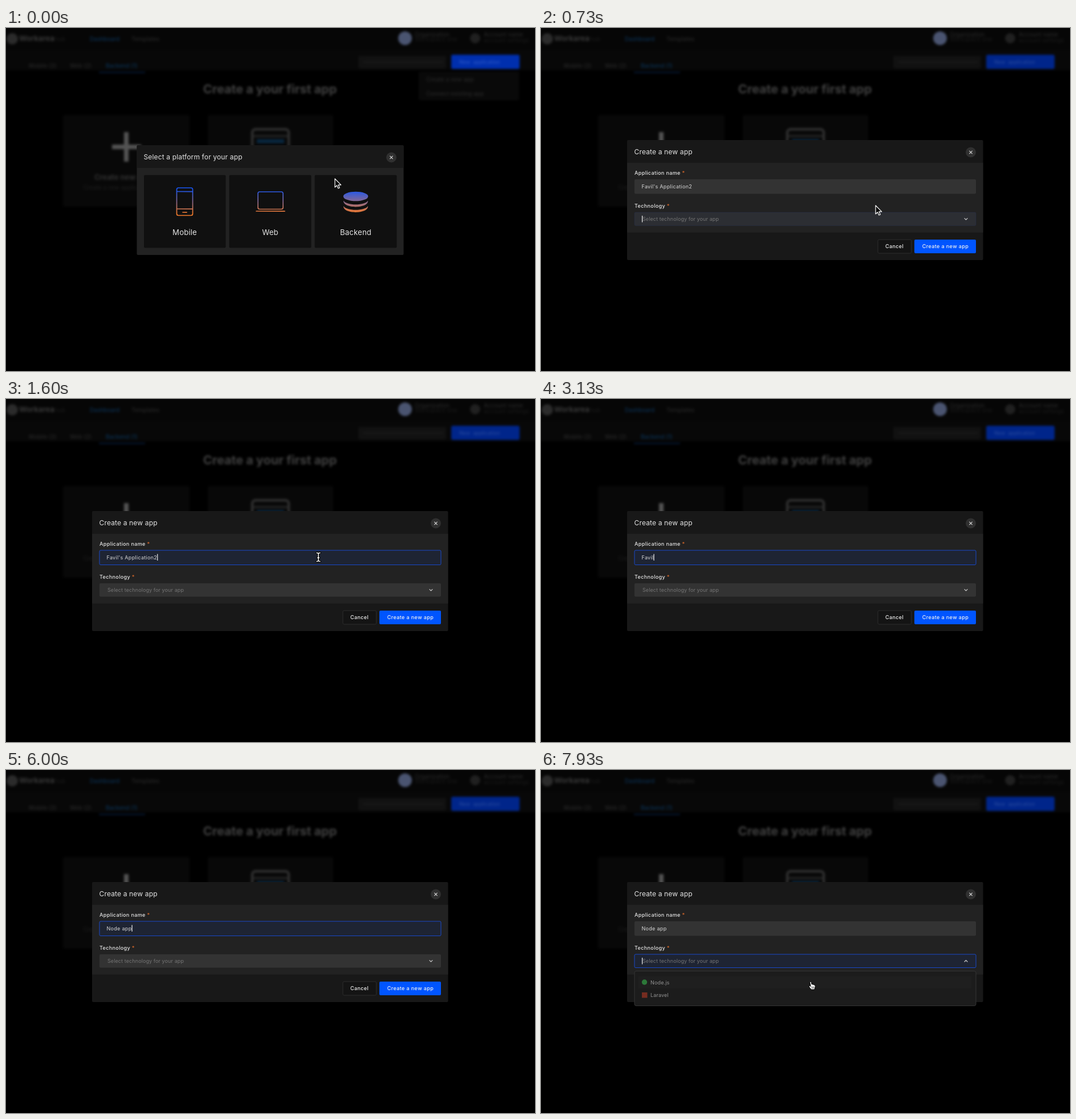
Animation of 928x603 px, one loop 8 s. Source, as an HTML page:

```html
<!DOCTYPE html>
<html lang="en">
<head>
<meta charset="utf-8">
<title>Create a new app</title>
<style>
html, body { margin: 0; width: 100%; height: 100%; overflow: hidden; background: #000; }
svg { display: block; }
text { font-family: Inter, sans-serif; white-space: pre; fill: #e4e4e4; }
.backdrop { filter: blur(2px); }
.backdrop text { font-size: 10px; fill: #272727; font-weight: 500; }
.backdrop .heading { font-size: 21.6px; font-weight: 700; fill: #404040; text-anchor: middle; }
.backdrop .link { fill: #0b3154; }
.title { font-size: 12px; letter-spacing: .15px; }
.platform { font-size: 13.2px; letter-spacing: .15px; text-anchor: middle; }
.label { font-size: 9.1px; letter-spacing: .32px; font-weight: 500; }
.value { font-size: 9px; letter-spacing: .3px; fill: #d6d6d6; }
.hint { font-size: 9px; letter-spacing: .1px; fill: #747474; }
.item { font-size: 9px; letter-spacing: .15px; fill: #929292; }
.button { font-size: 9px; letter-spacing: .38px; font-weight: 500; text-anchor: middle; fill: #f2f2f2; }
.star { fill: #d9692a; }
.head { fill: #181818; }
.body { fill: #222; }
.card { fill: #101010; }
.line { fill: none; stroke-width: 1.7; stroke-linecap: round; stroke-linejoin: round; }
</style>
</head>
<body>
<svg width="928" height="603" viewBox="0 0 928 603">
  <defs>
    <linearGradient id="tint" gradientUnits="userSpaceOnUse" x1="0" x2="0" y1="284" y2="326">
      <stop stop-color="#1856f5"/><stop offset="1" stop-color="#f37a2b"/>
    </linearGradient>
    <g id="close">
      <circle r="9" fill="#303030"/>
      <path d="M-2.6-2.6 2.6 2.6M2.6-2.6-2.6 2.6" stroke="#ddd" stroke-width="1.1"/>
    </g>
  </defs>

  <g class="backdrop">
    <rect x="-9" y="-9" width="946" height="47" fill="#060606"/>
    <rect x="-9" y="38" width="946" height="36" fill="#080808"/>
    <circle cx="11" cy="19" r="10" fill="#2b2b2b"/>
    <text x="23" y="23" style="font-size:13px;font-weight:700;fill:#383838">Workarea</text>
    <text x="86" y="23" style="fill:#181818">hub</text>
    <text x="147" y="23" class="link">Dashboard</text>
    <text x="220" y="23">Templates</text>
    <circle cx="700" cy="18" r="12" fill="#4a5470"/>
    <text x="717" y="15">Organization</text>
    <text x="717" y="23" style="fill:#181818">Workspace one</text>
    <circle cx="823" cy="18" r="9" fill="#202020"/>
    <text x="838" y="15">Account name</text>
    <text x="838" y="25" style="fill:#181818">account settings</text>
    <text x="40" y="70">Mobile (3)</text>
    <text x="112" y="70">Web (2)</text>
    <text x="175" y="70" class="link">Backend (1)</text>
    <path d="M163 78H244" stroke="#071d3c" stroke-width="2"/>
    <rect x="618" y="49" width="154" height="22" rx="3" fill="#111"/>
    <path d="M627 60H766" stroke="#1c1c1c" stroke-width="2"/>
    <rect x="781" y="47" width="120" height="25" rx="3" fill="#00258a"/>
    <text x="795" y="63" style="font-size:9px;fill:#25489c">New&#160; application</text>
    <g id="menu">
      <rect x="781" y="47" width="120" height="25" rx="3" fill="#002fae"/>
      <text x="795" y="63" style="font-size:9px;fill:#2a56c4">New&#160; application</text>
      <rect x="724" y="77" width="176" height="50" rx="3" fill="#090909"/>
      <text x="737" y="94">Create a new app</text>
      <text x="737" y="119">Connect existing app</text>
    </g>
    <text x="463" y="115" class="heading">Create a your first app</text>
    <rect x="100" y="153" width="222" height="161" rx="3" fill="#080808"/>
    <rect x="354" y="153" width="220" height="161" rx="3" fill="#080808"/>
    <path d="M211 183V235M186 209H237" stroke="#535353" stroke-width="8"/>
    <text x="155" y="267" style="font-size:13px;font-weight:700;fill:#303030">Create new app</text>
    <text x="136" y="284" style="fill:#1c1c1c">Create a new application</text>
    <rect x="432" y="178" width="64" height="55" rx="6" fill="#080808" stroke="#333" stroke-width="4"/>
    <path d="M433 190H495" stroke="#292929" stroke-width="3"/>
    <path d="M440 199H488" stroke="#082740" stroke-width="7"/>
  </g>

  <g id="picker">
    <rect class="body" x="229.5" y="206" width="468" height="193" rx="2"/>
    <rect class="head" x="229.5" y="206" width="468" height="40" rx="2"/>
    <text class="title" x="241.5" y="231">Select a platform for your app</text>
    <use href="#close" x="676" y="227.5"/>
    <rect class="card" x="242" y="258.5" width="143.5" height="128" rx="2"/>
    <rect class="card" x="391.5" y="258.5" width="144" height="128" rx="2"/>
    <rect class="card" x="541.5" y="258.5" width="144" height="128" rx="2" id="hover" stroke="#173c94"/>
    <g class="line" stroke="url(#tint)">
      <rect x="299.5" y="281" width="28" height="48.5" rx="3"/>
      <path d="M300 287.5 327 287.6M300 318 327 318.1M310 324 317 324.1"/>
      <rect x="442" y="288" width="44" height="30.5" rx="3"/>
      <path d="M439 322 489 322.1"/>
    </g>
    <g fill="url(#tint)">
      <ellipse cx="613.5" cy="296" rx="21.8" ry="8.3"/>
      <path id="disc" d="M592 303.5C597 312.5 630 312.5 635 303.5C636 318 591 318 592 303.5Z"/>
      <path d="M592 313C597 322 630 322 635 313C636 327.500 591 327.500 592 313Z"/>
    </g>
    <text class="platform" x="313.500" y="364">Mobile</text>
    <text class="platform" x="463.500" y="364">Web</text>
    <text class="platform" x="613.500" y="364">Backend</text>
  </g>

  <g id="form">
    <rect class="head" x="151" y="197" width="624.5" height="211" rx="2"/>
    <rect class="body" x="151" y="237" width="624.5" height="122.5"/>
    <text class="title" x="163.5" y="221.500">Create a new app</text>
    <use href="#close" x="754" y="218.500"/>
    <text class="label" x="164" y="258">Application name <tspan class="star">*</tspan></text>
    <rect id="nameBox" x="164" y="266" width="599" height="25.500" rx="2"/>
    <text class="hint" id="nameHint" x="177" y="282">Enter app name</text>
    <text class="value" id="name" x="176.500" y="282"></text>
    <text class="label" x="164" y="316">Technology <tspan class="star">*</tspan></text>
    <rect id="techBox" x="164" y="324" width="599" height="23.500" rx="2"/>
    <text class="hint" x="178" y="339">Select technology for your app</text>
    <path id="chevron" class="line" d="M-2.500-1.200 0 1.300 2.500-1.200" stroke="#ccc" style="stroke-width:1.200"/>
    <rect x="591" y="372" width="58.500" height="24" rx="2" fill="#141414" stroke="#2c2c2c"/>
    <text class="button" x="620" y="387">Cancel</text>
    <rect x="655" y="372" width="108" height="24" rx="2" fill="#0055ff"/>
    <text class="button" x="709.500" y="387">Create a new app</text>
    <g id="list">
      <rect x="164" y="353.500" width="599" height="61" rx="3" fill="#1c1c1c" stroke="#343434"/>
      <rect x="171" y="363" width="584" height="21" fill="#1f1f1f"/>
      <circle cx="181.500" cy="373" r="4.700" fill="#2c7839"/>
      <text class="item" x="192" y="376.500">Node.js</text>
      <rect x="177" y="391" width="9.500" height="9.500" fill="#752c20"/>
      <text class="item" x="192" y="399">Laravel</text>
    </g>
    <rect id="caret" width="1.200" height="11.500" fill="#eee"/>
  </g>

  <g id="cursor" stroke-linejoin="round" stroke-linecap="round">
    <path id="arrow" d="M0 0V15L3.500 11.800 5.800 17 8.200 16 6 10.900H10.700Z" fill="#080808" stroke="#fff" stroke-width="1.200"/>
    <g id="beam" fill="none">
      <path id="stem" d="M-3-7.500Q0-7.500 0-5.500Q0-7.500 3-7.500M0-5.500V5.500M-3 7.500Q0 7.500 0 5.500Q0 7.500 3 7.500M-1.500 1H1.500" stroke="#000" stroke-width="3.500"/>
      <use href="#stem" style="stroke:#fff"/>
      <path d="M-3-7.500Q0-7.500 0-5.500Q0-7.500 3-7.500M0-5.500V5.500M-3 7.500Q0 7.500 0 5.500Q0 7.500 3 7.500M-1.500 1H1.500" stroke="#fff" stroke-width="1.500"/>
    </g>
    <g id="hand">
      <path d="M-1.200 1Q0-1.500 1.200 1L2 5Q3.500 3.800 4.300 5.400Q5.800 4.500 6.500 6.200Q8.200 5.800 8.200 8L7.700 11 6.700 14H1L-2.800 9Q-3.500 6.900-1.300 7.300L-.1 8.300Z" fill="#fff" stroke="#000"/>
      <path d="M2.100 9V12M3.900 9V12M5.700 9V12" stroke="#222" stroke-width=".7"/>
    </g>
  </g>
</svg>
<script>
const LOOP = 8000, OLD = "Favil's Application2", NEW = "Node app";
const OPEN_FORM = 730, FOCUS_NAME = 1530, RETYPE = 4670, FOCUS_TECH = 6930;

// [time, characters shown]
const edits = [
  [FOCUS_NAME, 20], [2000, 15], [2067, 12], [2130, 10], [2270, 8], [2800, 7], [3000, 6],
  [3130, 5], [3270, 4], [3470, 3], [3600, 2], [3800, 1], [4000, 0],
  [RETYPE, 1], [4870, 2], [4930, 3], [5070, 4], [5470, 5], [5730, 6], [5870, 7], [6000, 8]
];
// [start, end, from, to]
const moves = [
  [70, 470, [577, 265], [587, 312]],
  [OPEN_FORM, 1270, [587, 312], [548, 278]],
  [6400, 6670, [548, 278], [485, 335]],
  [7200, 7930, [485, 335], [473, 372]]
];

const $ = id => document.getElementById(id);
const show = (id, on) => $(id).style.display = on ? "" : "none";
const clamp = v => Math.max(0, Math.min(1, v));
const mix = (a, b, k) => a + (b - a) * k;
const fade = (t, start, from) => t < start ? 0 : clamp(from + (t - start) / 100);

function paintBox(id, k) {
  const fill = [[51, 30], [51, 36], [51, 51]].map(([a, b]) => Math.round(mix(a, b, k)));
  $(id).setAttribute("fill", `rgb(${fill})`);
  $(id).setAttribute("stroke", `rgba(24,72,200,${k * k})`);
}

function drawCursor(t) {
  const [start, end, from, to] = moves.filter(m => m[0] <= t).pop() || moves[0];
  const p = clamp((t - start) / (end - start)), k = p * p * (3 - 2 * p);
  const x = mix(from[0], to[0], k), y = mix(from[1], to[1], k);
  const inField = y < 292 || (y > 324 && y < 348);
  const shape = t < 70 ? "arrow" : t < OPEN_FORM ? "hand"
    : inField ? "beam" : y > 354 ? "hand" : "arrow";
  for (const id of ["arrow", "beam", "hand"]) show(id, id === shape);
  show("cursor", t < 2000 || t >= 6400);
  $("cursor").setAttribute("transform", `translate(${x} ${y})`);
}

function drawForm(t) {
  const [edited, length] = edits.filter(e => e[0] <= t).pop() || [OPEN_FORM, 20];
  const text = (t < RETYPE ? OLD : NEW).slice(0, length);
  const open = t >= FOCUS_TECH, onName = t >= FOCUS_NAME && !open;
  $("name").textContent = text;
  show("nameHint", !text);
  show("list", open);
  paintBox("nameBox", onName ? fade(t, FOCUS_NAME, .5) : 0);
  paintBox("techBox", open ? fade(t, FOCUS_TECH, .8)
    : fade(t, OPEN_FORM, .3) - fade(t, FOCUS_NAME, .5));
  $("chevron").setAttribute("transform", `translate(745.5 335.8) scale(1 ${open ? -1 : 1})`);

  const since = t - (open ? FOCUS_TECH : edited);
  show("caret", since % 1000 < (text ? 500 : 270));
  $("caret").setAttribute("x", 177 + (onName && text ? $("name").getComputedTextLength() - .5 : 0));
  $("caret").setAttribute("y", onName ? 272.5 : 330);
}

function draw(now) {
  const t = now % LOOP, picking = t < OPEN_FORM;
  show("picker", picking);
  show("menu", picking);
  show("form", !picking);
  $("hover").setAttribute("stroke-opacity", clamp((t - 70) / 200));
  if (!picking) drawForm(t);
  drawCursor(t);
}

const begin = performance.now();
function tick() {
  draw(performance.now() - begin);
  requestAnimationFrame(tick);
}
tick();
</script>
</body>
</html>
```
